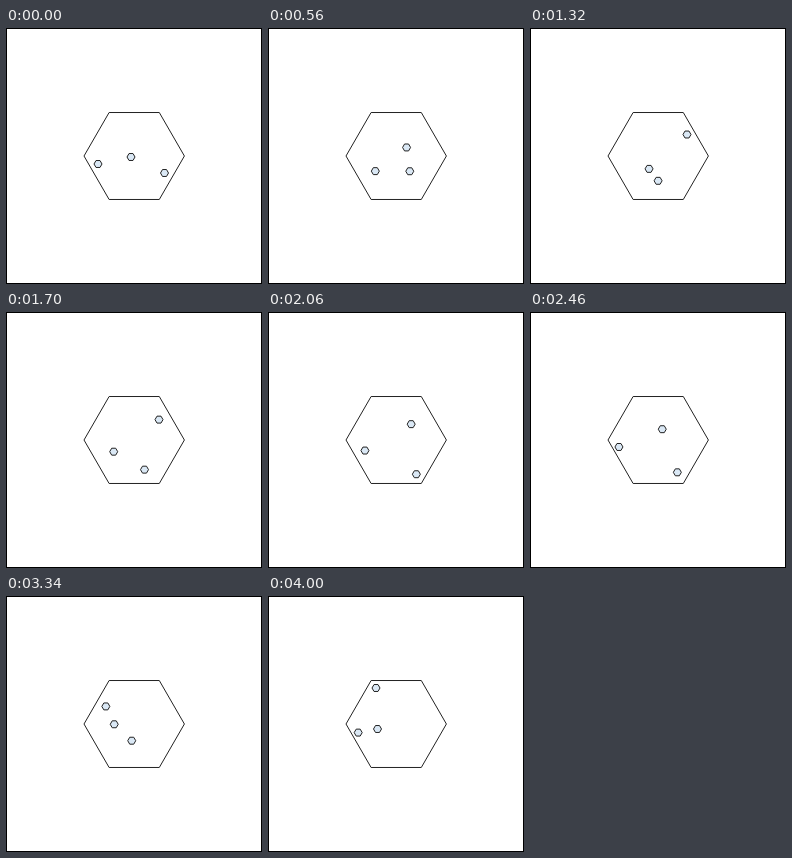
Recreate the animation shown at these times as an HTML page with a canvas. Size 256x256 px, loop 4.02 s.

```html
<!DOCTYPE html>
<html lang="en">
<head>
<meta charset="utf-8">
<title>Bouncing hexagons</title>
<style>
  html, body { margin: 0; width: 100%; height: 100%; overflow: hidden; background: #fff; }
  canvas { display: block; width: 256px; height: 256px; }
</style>
</head>
<body>
<canvas id="stage" width="256" height="256"></canvas>
<script>
const ctx = document.getElementById('stage').getContext('2d');
const STEP = 20, STEPS = 201;

// Each ball flies straight from start to one wall hit, then straight to end.
const balls = [
  { start: [92, 136], hit: [153, 164.4], end: [109.5, 133], hitStep: 111.5 },
  { start: [125, 129], hit: [160, 104.4], end: [90.2, 136.6], hitStep: 72.2 },
  { start: [158.5, 145], hit: [87.8, 137.6], end: [108, 92], hitStep: 118.3 }
];

const mix = (a, b, k) => a.map((v, i) => v + (b[i] - v) * k);

function position({ start, hit, end, hitStep }, step) {
  return step < hitStep
    ? mix(start, hit, step / hitStep)
    : mix(hit, end, (step - hitStep) / (STEPS - 1 - hitStep));
}

function hexagon([x, y], radius, fill) {
  ctx.beginPath();
  for (let i = 0; i < 6; i++) {
    const a = i * Math.PI / 3;
    ctx.lineTo(x + radius * Math.cos(a), y + radius * Math.sin(a));
  }
  ctx.closePath();
  ctx.fillStyle = fill;
  ctx.fill();
  ctx.stroke();
}

function draw(now) {
  const step = Math.floor(now / STEP) % STEPS;
  ctx.fillStyle = '#fff';
  ctx.fillRect(0, 0, 256, 256);
  ctx.lineWidth = 1;
  ctx.strokeStyle = '#000';
  ctx.strokeRect(0.5, 0.5, 255, 255);
  ctx.strokeStyle = '#222';
  hexagon([128.2, 128], 50.2, '#fff');
  for (const ball of balls) hexagon(position(ball, step), 4, '#dae8f5');
}

const began = performance.now();
function tick() {
  draw(performance.now() - began);
  requestAnimationFrame(tick);
}
tick();
</script>
</body>
</html>
```
